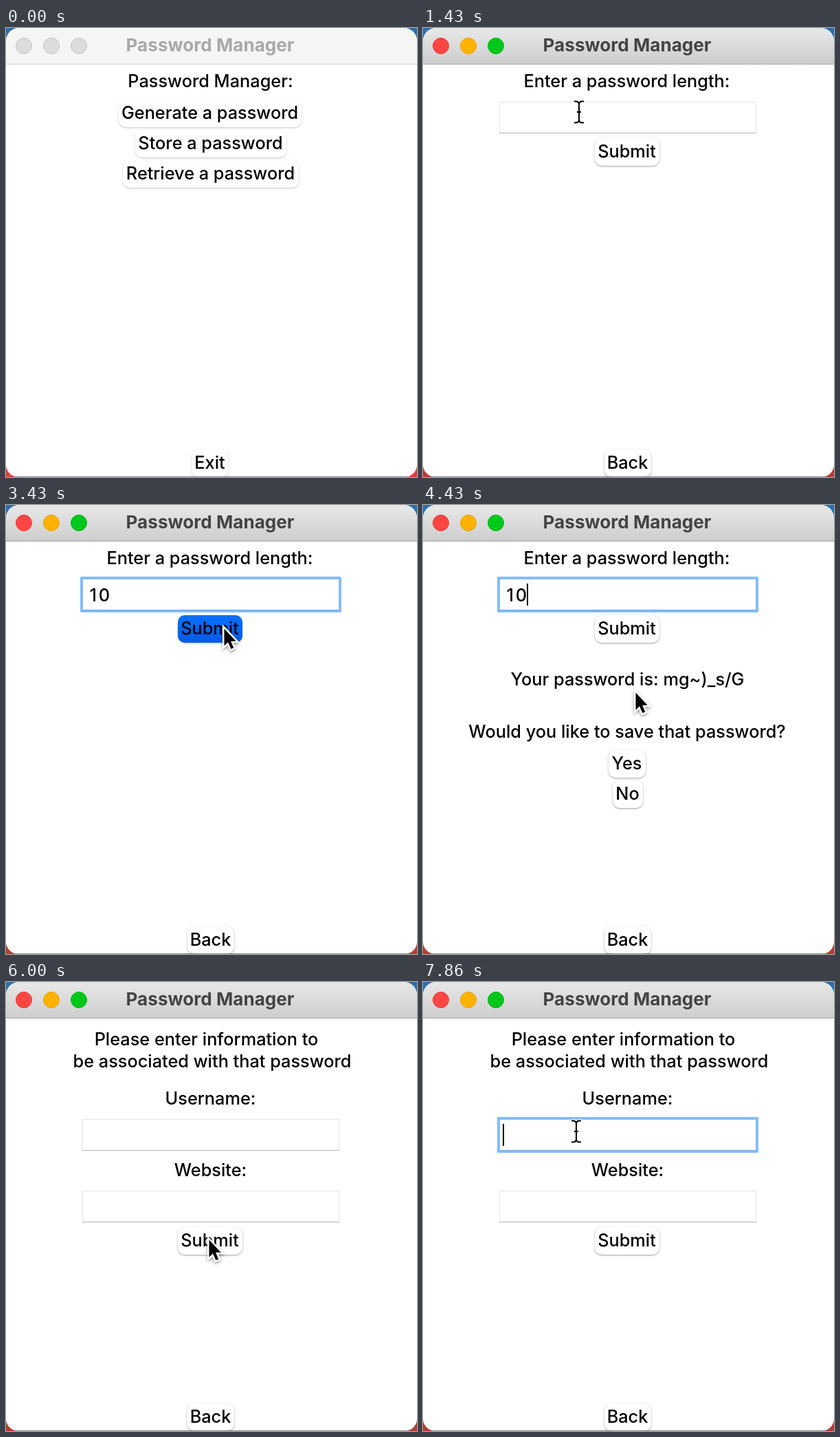
Recreate the animation shown at these times as an HTML page with a canvas. Size 598 by 652 pixels, loop 8 s.

```html
<!DOCTYPE html>
<html lang="en">
<head>
<meta charset="utf-8">
<title>Password Manager</title>
<style>
  html, body { margin: 0; width: 100%; height: 100%; overflow: hidden; background: #fff; }
  canvas { display: block; width: 598px; height: 652px; }
</style>
</head>
<body>
<canvas id="stage" width="598" height="652"></canvas>
<script>
const W = 598, H = 652, LOOP = 8000, STEPS = 56;
const ctx = document.getElementById('stage').getContext('2d');
const FAMILY = 'Inter, "Open Sans", sans-serif';
const BODY = '500 25.3px ' + FAMILY;
const BOLD = '700 26.1px ' + FAMILY;

// Steps (one seventh of a second each) at which the interface changes
const ACTIVE = 3, GEN_DOWN = 6, LENGTH_PAGE = 7, LENGTH_FOCUS = 12, TYPE_1 = 17, TYPE_0 = 18;
const SUBMIT_DOWN = 24, RESULT = 25, YES_DOWN = 39, INFO_PAGE = 40, USER_FOCUS = 51;

// Pointer path: step, x, y
const PATH = [
  [1, 288, 219], [3, 286, 214], [5, 238, 118], [6, 232, 111], [8, 232, 114],
  [12, 222, 129], [18, 222, 129], [20, 250, 142], [23, 316, 176], [24, 316, 177],
  [27, 316, 180], [31, 308, 270], [36, 295, 366], [38, 294, 372], [43, 294, 372],
  [48, 271, 327], [50, 226, 222], [51, 223, 217], [55, 223, 217]
];

function pointerAt(step) {
  if (step < PATH[0][0]) return null;
  for (let i = 1; i < PATH.length; i++) {
    const [s0, x0, y0] = PATH[i - 1], [s1, x1, y1] = PATH[i];
    if (step <= s1) {
      const k = (step - s0) / (s1 - s0), e = k * k * (3 - 2 * k);
      return { x: x0 + (x1 - x0) * e, y: y0 + (y1 - y0) * e };
    }
  }
  return null;
}

function roundRect(x, y, w, h, r) {
  ctx.beginPath();
  ctx.roundRect(x, y, w, h, r);
}

function vertical(y0, y1, c0, c1) {
  const g = ctx.createLinearGradient(0, y0, 0, y1);
  g.addColorStop(0, c0);
  g.addColorStop(1, c1);
  return g;
}

function text(str, x, midY, font = BODY, color = '#000') {
  ctx.font = font;
  ctx.fillStyle = color;
  ctx.textAlign = 'center';
  ctx.fillText(str, x, midY + 9);
}

function button(label, x, y, w, pressed, active = true) {
  ctx.save();
  ctx.shadowColor = active && !pressed ? 'rgba(0,0,0,.38)' : 'rgba(0,0,0,.24)';
  ctx.shadowBlur = 2.5;
  ctx.shadowOffsetY = 1;
  roundRect(x, y, w, 40, 10);
  ctx.fillStyle = pressed ? vertical(y, y + 40, '#0870fa', '#005be8') : '#fff';
  ctx.fill();
  ctx.restore();
  text(label, x + w / 2 - .5, y + 19);
}

function entry(y, { focus = false, value = '', caret = false } = {}) {
  if (focus) {
    ctx.fillStyle = '#83bdfb';
    roundRect(108, y - 3, 380, 52, 1.5);
    ctx.fill();
    ctx.fillStyle = '#fff';
    ctx.fillRect(112, y + 1, 372, 44);
    ctx.fillStyle = 'rgba(60,95,135,.3)';
    ctx.fillRect(112, y + 45, 372, 1);
  } else {
    ctx.fillStyle = '#fff';
    ctx.fillRect(111, y, 374, 46);
    ctx.strokeStyle = '#e5e5e5';
    ctx.lineWidth = 1;
    ctx.strokeRect(111.5, y + .5, 373, 45);
    ctx.fillStyle = '#b4b4b4';
    ctx.fillRect(111, y + 45, 374, 1);
  }
  // Digits are tabular: each sits in a cell as wide as a zero
  ctx.font = BODY;
  const cell = ctx.measureText('0').width;
  [...value].forEach((digit, i) => text(digit, 118.5 + cell * (i + .5), y + 24));
  if (caret) {
    const x = value ? 118.5 + cell * value.length : 116;
    ctx.fillStyle = '#000';
    ctx.fillRect(Math.round(x), y + 7, 2, 32);
  }
}

function titleBar(active) {
  ctx.fillStyle = active ? vertical(0, 52, '#e8e8e8', '#cecece') : '#f5f5f5';
  ctx.fillRect(0, 0, W, 52);
  ctx.fillStyle = active ? '#a4a4a4' : '#d1d1d1';
  ctx.fillRect(0, 52, W, 1);
  const lights = active
    ? [['#ff4642', '#e63b37'], ['#ffb300', '#e6a000'], ['#00c81a', '#00b216']]
    : Array(3).fill(['#dcdcdc', '#c3c3c3']);
  lights.forEach(([fill, edge], i) => {
    ctx.beginPath();
    ctx.arc(26 + 40 * i, 26, 11.5, 0, Math.PI * 2);
    ctx.fillStyle = fill;
    ctx.fill();
    ctx.strokeStyle = edge;
    ctx.lineWidth = 1;
    ctx.stroke();
  });
  text('Password Manager', 297, 25, BOLD, active ? '#444' : '#a9a9a9');
}

function menuPage(step, active) {
  text('Password Manager:', 297.5, 77);
  button('Generate a password', 164, 104, 266, step === GEN_DOWN, active);
  button('Store a password', 188, 148, 220, false, active);
  button('Retrieve a password', 170, 192, 256, false, active);
  button('Exit', 270, 612, 54, false, active);
}

// 600 ms on, 300 ms off, counted from the moment of focus
const caretOn = (step, from) => (step - from) * LOOP / STEPS % 900 < 600;

function lengthPage(step) {
  text('Enter a password length:', 296.5, 77);
  const focus = step >= LENGTH_FOCUS;
  const value = step >= TYPE_0 ? '10' : step >= TYPE_1 ? '1' : '';
  entry(107, { focus, value, caret: focus && caretOn(step, LENGTH_FOCUS) });
  button('Submit', 250, 160, 94, step === SUBMIT_DOWN);
  if (step >= RESULT) {
    text('Your password is: mg~)_s/G', 297.5, 253);
    text('Would you like to save that password?', 297, 329);
    button('Yes', 270, 356, 54, step === YES_DOWN);
    button('No', 276, 400, 44);
  }
  button('Back', 264, 612, 68);
}

function infoPage(step) {
  text('Please enter information to', 291.5, 83);
  text('be associated with that password', 300, 115);
  text('Username:', 297.5, 169);
  const focus = step >= USER_FOCUS;
  entry(199, { focus, caret: focus && caretOn(step, USER_FOCUS) });
  text('Website:', 297.5, 273);
  entry(303);
  button('Submit', 250, 356, 94);
  button('Back', 264, 612, 68);
}

function arrow(x, y) {
  ctx.save();
  ctx.translate(x + 1.5, y + 2.5);
  const shape = new Path2D('M0 0V25L5.5 19.8L9.8 29.6L13.8 27.9L9.6 18.2H17.2Z');
  ctx.lineWidth = 5;
  ctx.strokeStyle = '#fff';
  ctx.shadowColor = 'rgba(0,0,0,.4)';
  ctx.shadowBlur = 4;
  ctx.shadowOffsetY = 2;
  ctx.stroke(shape);
  ctx.shadowColor = 'transparent';
  ctx.fillStyle = '#000';
  ctx.fill(shape);
  ctx.restore();
}

function iBeam(x, y) {
  ctx.save();
  ctx.translate(Math.round(x), Math.round(y));
  const shape = new Path2D(
    'M-7 -15.5H-5Q0 -15.5 0 -11Q0 -15.5 5 -15.5H7M0 -11V11' +
    'M-7 15.5H-5Q0 15.5 0 11Q0 15.5 5 15.5H7M-3 0H3');
  for (const [width, color] of [[4.5, '#fff'], [2, '#000']]) {
    ctx.lineWidth = width;
    ctx.strokeStyle = color;
    ctx.stroke(shape);
  }
  ctx.restore();
}

function pointer(step) {
  const p = pointerAt(step);
  if (!p) return;
  const over = top => p.x > 111 && p.x < 485 && p.y > top && p.y < top + 46;
  const onField = step >= INFO_PAGE ? over(199) || over(303)
    : step >= LENGTH_PAGE && over(107);
  (onField ? iBeam : arrow)(p.x, p.y);
}

function draw(step) {
  const active = step >= ACTIVE;
  ctx.fillStyle = '#2b70ad';
  ctx.fillRect(0, 0, W, H / 2);
  ctx.fillStyle = active ? '#b83a32' : '#d8423b';
  ctx.fillRect(0, H / 2, W, H / 2);
  ctx.save();
  roundRect(0, 0, W, H, [19, 19, 18, 18]);
  ctx.clip();
  ctx.fillStyle = '#fff';
  ctx.fillRect(0, 0, W, H);
  titleBar(active);
  if (step < LENGTH_PAGE) menuPage(step, active);
  else if (step < INFO_PAGE) lengthPage(step);
  else infoPage(step);
  ctx.fillStyle = 'rgba(0,0,0,.45)';
  ctx.fillRect(0, H - 1, W, 1);
  ctx.restore();
  pointer(step);
}

const start = performance.now();
function tick() {
  const t = (performance.now() - start) % LOOP;
  draw(Math.floor(t * STEPS / LOOP + .05) % STEPS);
  requestAnimationFrame(tick);
}
tick();
</script>
</body>
</html>
```
